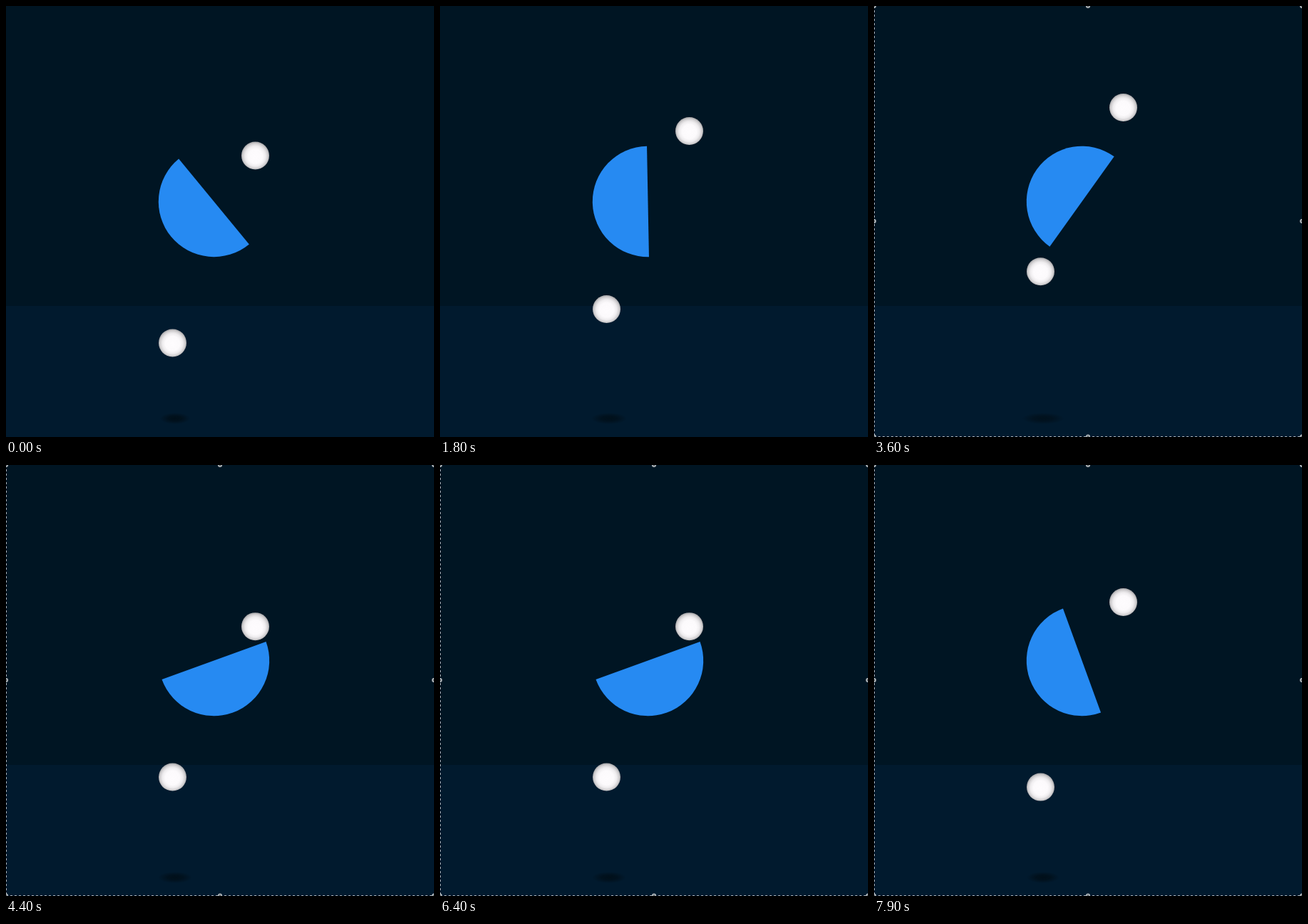
An HTML page with a canvas for the animation above (8000 ms loop, 600x605 px).

```html
<!DOCTYPE html>
<html lang="en">
<head>
<meta charset="utf-8">
<title>Half disc and two balls</title>
<style>
  html, body { margin: 0; width: 100%; height: 100%; overflow: hidden; background: #001523; }
  canvas { display: block; width: 600px; height: 605px; }
</style>
</head>
<body>
<canvas id="stage" width="600" height="605"></canvas>
<script>
const ctx = document.getElementById('stage').getContext('2d');
const W = 600, H = 605;
const LOOP = 8000, STEP = 100, CYCLE = 2000;
const CX = 291.5, CY = 274.5, R = 77.7, BALL = 19.5;
const FRAME_ON = 2300; // when the selection outline appears

// Piecewise linear value through [x, y] points.
function track(points, x) {
  for (let i = 1; i < points.length; i++) {
    const [x0, y0] = points[i - 1], [x1, y1] = points[i];
    if (x <= x1) return y0 + (y1 - y0) * (x - x0) / (x1 - x0);
  }
  return points[points.length - 1][1];
}

const drift = [[0, 8], [1800, -5], [2800, -17], [4400, 0]];
const hop = [[0, 0], [600, 156], [800, 194.5], [2000, 0]];

const wrap = q => ((q % CYCLE) + CYCLE) % CYCLE;

function disc(x, y, r, fill) {
  ctx.fillStyle = fill;
  ctx.beginPath();
  ctx.arc(x, y, r, 0, Math.PI * 2);
  ctx.fill();
}

function ball(x, y) {
  const g = ctx.createRadialGradient(x, y + 1.5, 0, x, y + 0.6, BALL + 0.6);
  g.addColorStop(0, '#fefcfe');
  g.addColorStop(0.5, '#fcfafc');
  g.addColorStop(0.7, '#efedef');
  g.addColorStop(0.86, '#d3d1d3');
  g.addColorStop(1, '#a5a4a6');
  disc(x, y, BALL, g);
}

function halfDisc(angle) {
  ctx.fillStyle = '#268af2';
  ctx.beginPath();
  ctx.arc(CX, CY, R, angle - Math.PI / 2, angle + Math.PI / 2);
  ctx.fill();
}

function shadow(height) {
  const rx = 21 + height * 0.085;
  const a = 0.72 - height * 0.0014;
  ctx.save();
  ctx.translate(237, 579);
  ctx.scale(rx, 8);
  const g = ctx.createRadialGradient(0, 0, 0, 0, 0, 1);
  g.addColorStop(0, `rgba(0,10,16,${a})`);
  g.addColorStop(0.45, `rgba(0,10,16,${a * 0.8})`);
  g.addColorStop(1, 'rgba(0,10,16,0)');
  disc(0, 0, 1, g);
  ctx.restore();
}

function outline() {
  ctx.strokeStyle = '#a9b2b8';
  ctx.lineWidth = 1;
  ctx.setLineDash([3, 3]);
  ctx.beginPath();
  ctx.moveTo(0.5, 0);
  ctx.lineTo(0.5, H);
  ctx.moveTo(0, H - 0.5);
  ctx.lineTo(W, H - 0.5);
  ctx.stroke();
  ctx.setLineDash([]);
  for (const x of [0, W / 2, W]) {
    for (const y of [0, 302, H - 0.5]) {
      if (x === W / 2 && y === 302) continue;
      disc(x, y, 3, '#c9cdd0');
      disc(x, y, 1.9, '#70777c');
    }
  }
}

function draw(t) {
  const q = wrap(t + track(drift, t) - 289);
  const topY = 255.5 - track(hop, q);
  const lowY = 294 + track(hop, wrap(q + CYCLE / 2));

  ctx.fillStyle = '#001523';
  ctx.fillRect(0, 0, W, H);
  ctx.fillStyle = '#011a2e';
  ctx.fillRect(0, 421, W, H - 421);

  shadow(Math.max(0, 472 - lowY));
  halfDisc(Math.PI / 2 - q / CYCLE * Math.PI * 2);
  ball(349.5, topY);
  ball(233.5, lowY);
  if (t >= FRAME_ON) outline();
}

const start = performance.now();

function tick(now) {
  const t = Math.max(0, now - start) + 4;
  draw(Math.floor(t / STEP) * STEP % LOOP);
  requestAnimationFrame(tick);
}

draw(0);
requestAnimationFrame(tick);
</script>
</body>
</html>
```
